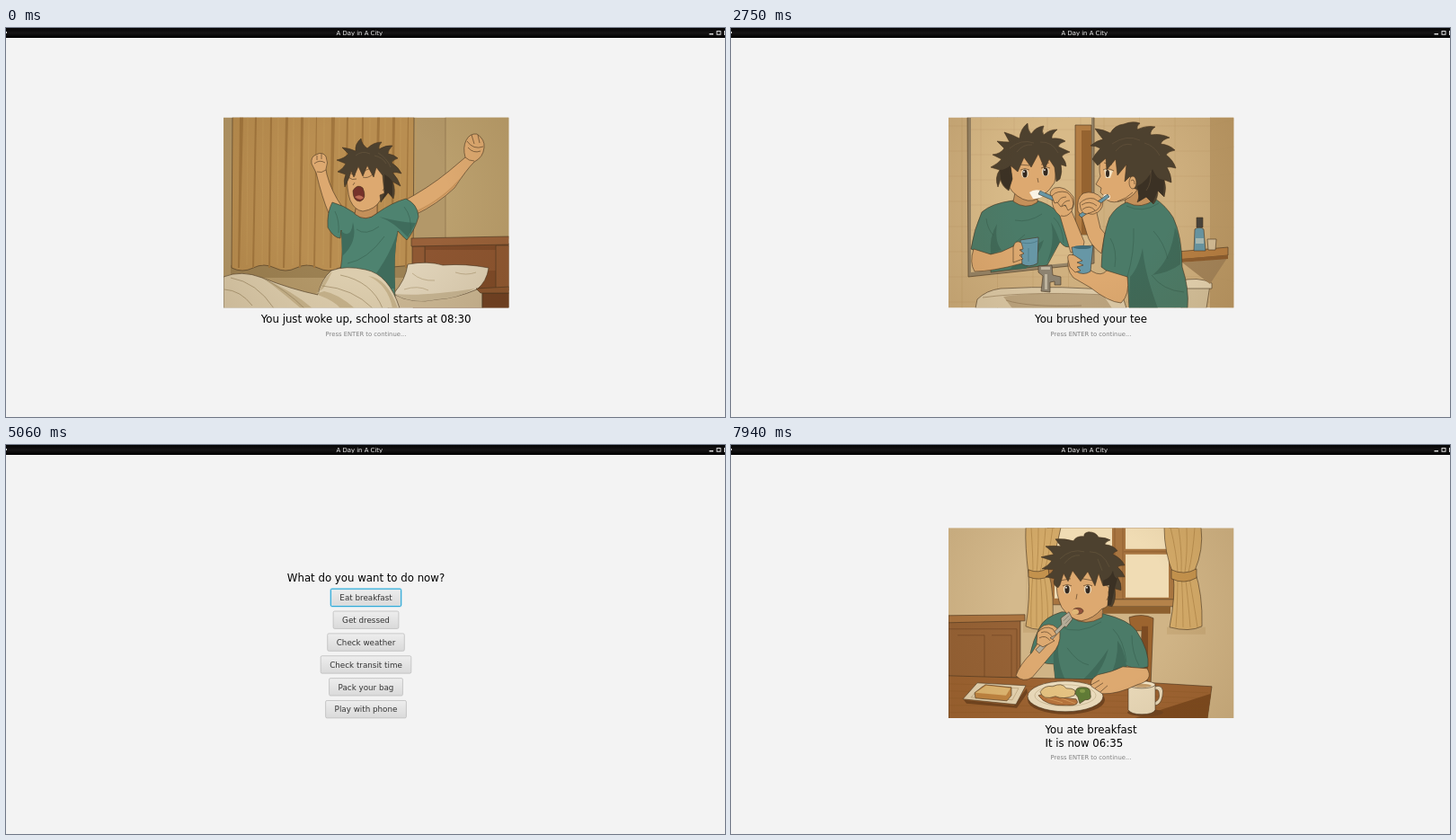
An HTML page with a canvas for the animation above (8 s loop, 800 by 433 pixels).

```html
<!DOCTYPE html>
<html lang="en">
<head>
<meta charset="utf-8">
<title>A Day in A City</title>
<style>
html, body { margin: 0; width: 100%; height: 100%; overflow: hidden; background: #f3f3f3; }
canvas { display: block; }
</style>
</head>
<body>
<canvas id="stage" width="800" height="433"></canvas>
<script>
const g = document.getElementById('stage').getContext('2d');
const MID = 400.5, LOOP = 8000, STEP = 62.5, CHAR = 51, BUTTON = 93;
const SKIN = '#dda970', SHADE = '#c4905a', HAIR = '#4d412f', LOCK = '#3b3124', SHIRT = '#4b7b68', DARK = '#38614f';
const BLUE = '#6797a6', INK = '#46331f';
const series = (n, f) => Array.from({ length: n }, (_, i) => f(i));
const oval = (x, y, a, b) => `M${x - a} ${y}a${a} ${b} 0 1 0 ${2 * a} 0a${a} ${b} 0 1 0 ${-2 * a} 0z`;
const eye = (x, y) => [
  '#f0dfc0 ' + oval(x, y, 4, 5), '#33281f ' + oval(x, y, 2.6, 4.6), '#fff ' + oval(x - 1, y - 2, .8, 1),
  `-${INK} M${x - 5} ${y - 4}Q${x} ${y - 7} ${x + 5} ${y - 4}`];

// Each entry is "colour path"; "+" also outlines the shape, "-" only strokes it.
const bedroom = [
  '#b39869 M242 99h318v213H242z', '#bba06e M489 99h71v136h-71z', '-#836a45 M489 99V234',
  '#9c8153 M250 264H454V278H250z',
  '+#b98e51 M252 99L251 267Q263 273 275 267T299 267T323 267T347 267T371 267T395 267T419 267L453 264L454 99z',
  ...series(12, i => `#a1763e M${260 + i * 17} 99l${-2 - i % 2} 168h2l${4 - i % 3}-168z`),
  ...series(12, i => `-#c39a5c M${269 + i * 17} 99l-1 165`),
  '+#7e4a29 M453 240H560V312H453z', '#8d5531 M467 247H545V270H467z',
  '+#8f5833 M452 243H466V275H452zM545 242H560V292H545z', '+#99613a M451 234L560 232V241L451 243z',
  '+#cbb896 M430 296L530 290V312H425z',
  '+#e0d3b9 M431 296Q445 280 447 263Q470 259 486 264Q512 262 537 267Q535 282 524 291Q500 301 480 302Q452 308 431 296z',
  '#c6b594 M432 296Q465 299 522 290Q500 302 480 302Q452 308 432 296z',
  '-#a8946f M452 273Q462 282 477 281M500 272Q512 276 523 272M443 291Q458 286 470 292',
  '+#6f4024 M530 295H560V312H530z', '+#8b5631 M523 290L560 288V295H528z',
  `+${SKIN} M359 206Q352 190 345 161L340 151Q339 143 345 141Q352 137 356 143Q359 150 356 157L357 163Q362 182 374 199z`,
  `-${INK} M343 151Q349 146 355 150M346 142v5M351 140v6M346 160Q351 162 356 158`,
  `+${SKIN} M440 194Q470 178 492 160L511 144Q508 133 512 125Q516 117 524 118Q533 124 532 133Q531 144 521 149Q512 158 499 178Q480 196 455 208z`,
  `-${INK} M513 126Q520 136 531 132M514 133Q520 140 528 137M518 119l3 10M525 119l2 9M511 144Q515 148 521 148`,
  `#c8945c M457 206Q480 194 499 177L507 165Q486 190 457 203z`,
  `+#4e8370 M363 194Q375 197 388 206Q400 217 413 206Q430 194 445 190Q458 196 459 210Q455 225 446 236Q441 232 436 226Q430 250 433 300H366L372 270Q376 245 373 225L372 234Q365 234 358 222Q357 205 363 194z`,
  `#3f6c5c M436 226Q424 262 398 290H433Q431 252 436 226zM373 226Q384 236 386 216Q392 238 374 254zM415 210Q432 216 447 233L456 217Q437 216 415 210z`,
  `-${DARK} M380 262Q402 258 421 232M390 224Q400 232 415 221M366 204Q371 214 370 228M443 199Q452 210 450 228`,
  `+${SHADE} M390 196L388 207Q400 217 413 206V193z`,
  `+${SKIN} M379 158Q379 181 383 192Q388 203 397 204Q411 202 417 191Q427 186 427 174Q426 166 421 166L420 145H384z`,
  `-${INK} M381 166Q385 170 390 168M397 166Q402 168 408 163M381 161l8 3M396 160l10-4M419 181Q424 177 423 171M388 172l-2 3`,
  `+#75322a M386 181Q391 173 397 178Q402 190 394 193Q386 193 386 181z`, '#bd6c55 M388 188Q394 184 398 189Q394 193 388 188z',
  `+${HAIR} M382 166L377 177Q375 170 378 163L369 160Q376 156 378 151L368 147Q377 145 381 140L374 133Q383 134 389 137Q388 129 395 123Q396 130 402 134Q409 127 418 127Q414 131 415 135Q423 130 430 131Q425 136 425 140Q432 141 436 145Q430 147 429 150Q437 155 440 162Q434 160 430 161Q436 167 439 176L430 171Q434 180 431 190L425 183L417 194L416 186L421 184L419 164L412 155L409 166L402 153L397 165L392 154L387 166L384 159z`,
  `${LOCK} M421 163Q427 166 430 171L430 188L425 183L418 192L421 184z`,
  '-#6a5940 M389 142Q396 136 405 140M410 142Q419 144 423 151M414 139Q424 145 428 155',
  `+#dccdae M242 277Q262 269 285 278Q318 291 347 297Q351 279 362 270Q378 264 400 269Q426 274 438 312H242z`,
  '#c5b28c M344 296L353 290Q359 280 363 271Q353 277 347 297Q366 304 372 312H388Q370 296 354 293zM287 279Q302 290 328 312H341Q319 293 287 279zM403 276Q425 286 430 312H436Q424 278 403 276z',
  '-#8f7b56 M250 278Q279 283 298 312M285 278Q312 292 332 312M352 287Q386 290 408 312M372 275Q407 282 419 312M243 291Q261 292 274 309'
];

const bathroom = [
  '#cfb07f M242 99h318v213H242z', '#bd9b68 M533 99h27v213h-27z',
  ...series(8, i => `-#b9976699 M242 ${109 + i * 28}H533L560 ${102 + i * 30}`),
  ...series(8, i => `-#b9976699 M${257 + i * 39.5} 99V312`),
  '+#968467 M263 99H404V262L264 277z', '#d8ba88 M267 99H401V259L267 272z',
  ...series(6, i => `-#bea07499 M267 ${113 + i * 28}H401`), ...series(4, i => `-#bea07499 M${278 + i * 37} 99V262`),
  '+#b27d44 M383 108H401V230H383z', '#956330 M390 114H401V230H390z',
  `+${SHIRT} M314 192Q290 195 279 205Q270 225 267 246Q278 252 290 252L289 272L352 264L366 238Q372 246 378 243Q375 215 362 203Q350 194 340 192z`,
  `#3f6a59 M289 252Q287 232 296 218Q293 238 301 247zM351 262L366 238Q361 224 356 216Q361 238 351 262zM310 269Q328 248 348 236Q344 252 328 268z`,
  `-${DARK} M284 212Q285 223 292 231M316 214Q331 217 346 207M310 247Q318 236 327 230M359 211Q369 220 370 239`,
  `+${SHADE} M317 179L314 193Q328 203 341 194V178z`,
  `+${SKIN} M304 150Q304 172 313 182Q325 194 336 192Q350 188 360 172L363 150L350 132H310z`,
  ...eye(327, 162), ...eye(350, 160),
  `-${INK} M321 152l11 1M345 152l9-2M341 167l1 5`,
  `+${HAIR} M309 181Q301 176 300 168L297 177Q293 166 299 158L289 155Q297 151 301 146L291 141Q300 140 304 134L296 126Q304 127 310 127L304 116Q314 119 321 123Q322 112 330 106Q330 114 334 118Q339 110 348 109Q345 115 348 119Q354 113 363 113Q356 119 357 123Q366 122 372 126Q365 128 364 132L377 138Q370 140 368 143Q373 149 373 154L367 152Q369 160 366 168L362 171L360 155L354 146L349 157L342 140L334 155L326 144L319 160L311 153L313 168z`,
  `${LOCK} M299 158Q305 158 311 153L313 168L309 180Q302 175 300 168z`,
  '-#68573f M310 134Q323 123 337 128M344 127Q357 126 364 139M318 138Q325 129 335 130',
  `+${SKIN} M270 246Q265 261 271 271Q290 271 324 262L327 241Q320 235 314 243L301 249L289 252z`,
  `+${BLUE} M322 236L342 233L341 262Q332 267 324 263z`, '-#42707d M324 239Q334 241 341 237M331 245v15',
  `+${SKIN} M314 244Q316 235 323 239L325 246L321 247L326 251L321 253L325 257L314 261z`,
  `+${SKIN} M357 190Q352 182 360 178Q372 175 381 188Q383 196 379 204L393 238Q393 248 378 250L366 209Q357 202 357 190z`,
  '#faf4e5 M332 183Q338 178 349 182Q349 190 336 190z',
  `+${BLUE} M344 181L381 198L379 201L342 185z`,
  `+${SKIN} M357 187Q363 180 374 183Q383 190 380 200L375 203L372 197L367 199L363 194L360 195z`,
  `-${INK} M364 194Q366 188 373 188M368 198Q371 192 377 192M367 209Q374 211 379 204`,
  '+#dccaa8 M274 302Q284 292 300 290Q370 286 434 293L440 312H272z', '#bda681 M303 299Q337 293 414 297L424 312H313z',
  '-#8e7552 M280 300Q338 292 434 298M306 303Q330 311 390 309',
  '+#8d8371 M345 293L347 276L342 272V265L357 264L358 275L367 277V286H360V282L355 283V294z', '#c0b6a1 M345 266h10v3h-10zM349 274h3v17h-3z',
  '+#d6c39e M502 285Q522 279 533 286L529 312H501z', '+#e6d5b3 M497 282Q520 276 535 284V290H499z',
  '#a4855b M502 261L552 256L533 285z', '+#b77f43 M496 249L553 244V253L498 258z', '#8d5d2f M499 257L553 253V257L500 261z',
  `+${BLUE} M516 224Q521 220 526 224L528 248H515z`, '+#47433c M518 211h7v11h-7z', '#a9bdb9 M517 234h9v6h-9z', '+#d5bf99 M530 235h10l-1 12h-8z',
  `+${SKIN} M386 204Q384 189 392 184Q404 180 413 190Q416 200 407 206L411 223L416 229L412 251Q399 241 396 229L390 209z`,
  `+${SHADE} M440 180L438 198Q455 207 472 192L470 174z`,
  `+${SHIRT} M440 194Q428 199 421 211Q413 232 412 266Q425 277 441 277L443 312H508Q510 290 502 266Q502 232 492 211Q484 198 472 190Q457 203 440 194z`,
  `#3f6a59 M444 277Q453 268 458 245Q460 272 475 312H443zM494 222Q490 258 469 275Q488 272 500 263Q501 236 494 222z`,
  `-${DARK} M448 223Q449 250 441 277M422 234Q430 247 427 266M470 226Q482 239 486 257M468 275Q480 292 504 294M440 198Q458 207 476 195`,
  `+${SKIN} M418 270L441 277Q444 297 434 306Q420 305 400 289L381 278Q372 268 376 255Q382 248 388 260L402 271Q412 277 418 270z`,
  `+${BLUE} M379 244L403 242L400 271Q392 276 384 271z`, '#416c78 ' + oval(391, 244, 10, 2),
  `+${SKIN} M375 258Q373 250 382 253L391 259L385 261L392 264L385 266L389 270L383 272L377 266z`,
  `+${SKIN} M411 146Q409 158 411 165L406 174L412 178L411 183L416 188Q420 196 432 193Q446 190 452 180L455 150L440 130H415z`,
  '#f0dfc0 M415 157L425 159L422 167L417 167z', `#33281f ${oval(419, 162, 2, 4)}`,
  `-${INK} M414 158Q419 155 426 159M415 150l9 2M430 193Q440 190 447 183`,
  `+${HAIR} M402 146Q406 139 411 134Q406 131 400 131Q407 125 414 124Q409 118 405 112Q415 113 422 117Q427 108 437 107Q447 103 455 106Q451 109 452 113Q462 108 472 110Q466 114 467 119Q478 117 488 122Q480 124 478 129Q488 130 494 136Q487 137 484 141Q492 147 495 156Q488 154 485 155Q490 163 490 172L482 169Q485 178 482 188L475 181Q475 190 470 196L462 188L452 194L456 181L447 178L444 165L438 171L440 152L430 164L428 146L418 158L417 145L408 153z`,
  `${LOCK} M452 176Q464 170 469 157Q474 170 482 169L481 187L475 181L469 195L462 188L454 193z`,
  '-#68573f M424 129Q440 118 455 125M460 128Q471 131 477 142M428 137Q436 127 446 130M467 159Q468 173 462 181',
  `+${SKIN} ${oval(447, 172, 4, 7)}`, `-${INK} M445 170Q449 167 449 174`,
  '#faf4e5 ' + oval(418, 188, 4, 3), `+${BLUE} M387 208L419 185L421 188L390 211z`,
  `+${SKIN} M388 195Q395 188 404 190L412 195Q410 202 404 204L396 207Q389 207 388 195z`,
  `-${INK} M390 197Q399 191 407 198M391 202Q399 196 405 203M397 206Q403 209 407 205`
];

const breakfast = [
  '#d0b486 M242 99h318v213H242z', '#dac09466 M242 99H328V196H242z', '#ab8a5844 M325 205H365V216H325zM485 210H528V218H485z',
  '+#a87540 M352 99H497V185H352z', '#f0dcb4 M360 99H424V178H360zM439 99H487V123H439zM439 129H487V177H439z',
  '-#815326 M427 99V182M436 99V182M437 126H488', '+#b4824a M410 179H494V187H410z', '#8d602f M414 187H489V195H414z',
  '+#d2a968 M328 99H367Q363 124 353 147Q361 176 357 209Q343 216 328 209Q333 177 331 151Q327 120 328 99z',
  '+#d2a968 M482 99H523Q526 124 516 147Q525 173 524 209Q510 216 488 210Q495 174 492 151Q482 126 482 99z',
  ...series(4, i => `-#a77c40 M${334 + i * 8} 99Q${336 + i * 6} 130 ${336 + i * 4} 150Q${333 + i * 7} 185 ${334 + i * 6} 210`),
  ...series(4, i => `-#a77c40 M${489 + i * 9} 99Q${496 + i * 6} 128 ${497 + i * 4} 149Q${497 + i * 6} 183 ${495 + i * 8} 210`),
  '+#c3924d M331 146Q342 151 353 144L354 153Q343 159 331 154zM490 146Q504 153 518 145V155Q504 163 490 156z',
  '+#966236 M242 201H322V266H242z', '+#ab7440 M242 197L327 196V203L242 205z', '-#6b4120 M242 212H318V266M252 219H282V266M290 219H312V266',
  '+#9c642f M443 199Q458 194 470 200L467 275H455L457 214H445z', '#7d4b22 M457 209h7v62h-7z',
  `+${SHIRT} M368 193Q348 199 343 211Q336 225 333 239Q344 252 359 251L361 270H441L440 253Q453 258 464 254Q466 237 451 214Q443 202 414 195z`,
  `#3f6a59 M359 251Q357 232 366 222Q360 243 372 269H361zM440 253Q437 233 430 225Q431 250 419 270H441zM390 270Q406 255 420 234Q415 255 401 270z`,
  `-${DARK} M365 209Q386 220 412 204M446 219Q446 238 454 253M374 233Q386 250 398 252M425 212Q437 224 440 249M347 218L342 241`,
  `+${SHADE} M382 191L379 199Q394 210 413 199L414 184z`,
  `+${SKIN} M362 152Q361 175 368 188Q378 202 390 203Q404 200 412 190Q423 187 425 173Q425 165 419 165L416 140H370z`,
  ...eye(374, 168), ...eye(397, 168),
  `-${INK} M367 158l11-2M391 156l11 2M385 173l-1 6M418 180Q422 175 420 170M372 156`,
  `+#91523b ${oval(386, 192, 6, 3.5)}`, '#e0b676 ' + oval(383, 193, 4, 3),
  `+${HAIR} M364 166Q357 163 360 156L350 154Q357 150 359 146L346 145Q354 141 357 136L345 132Q353 130 359 129Q356 124 350 120Q360 119 367 120Q364 116 361 112Q371 111 381 114Q384 108 393 109Q392 105 398 104Q406 104 409 110Q417 110 422 113Q416 115 416 118Q426 119 430 125Q426 126 425 129Q434 133 438 141Q432 141 430 143Q436 148 438 154L430 154Q435 161 434 169L427 167Q429 179 424 187L419 186L421 163L414 164L409 150L405 164L397 148L389 159L380 147L375 159L370 150L366 163z`,
  `${LOCK} M414 158Q422 156 425 147Q426 155 430 156L427 167L423 185L419 186L421 163L414 164z`,
  '-#69593f M366 134Q378 122 393 126M399 126Q414 126 421 143M371 139Q379 129 388 130M408 134L413 147',
  `+#9d6332 M242 264Q304 266 404 268L535 276L530 312H242z`, '#7c491f M447 312L534 284L530 312z',
  ...series(5, i => `-#80501f66 M242 ${273 + i * 8}Q350 ${276 + i * 7} 531 ${283 + i * 6}`),
  '#704420 M259 291L315 297L329 278L330 283L318 300L262 295z', '+#e6d5b3 M258 290L274 272L328 275L317 296z', '-#b39b72 M267 288L279 276L320 278L313 291z',
  '+#c18643 M271 283L283 274L312 277V286L307 292L272 289z', '#e0b873 M272 283L284 275L311 278L306 286z',
  '#704420 ' + oval(373, 291, 43, 16), '+#ebdcbd ' + oval(372, 287, 42, 17), '-#bda983 ' + oval(372, 286, 34, 12),
  '+#b7743d M342 286Q352 281 365 288L384 290Q390 298 373 297Q350 298 342 286z', '-#e3b06d M348 288L369 294M362 287L383 295',
  '+#e5c382 M344 282Q349 274 358 276Q368 271 373 278Q387 278 382 286Q370 291 361 287Q347 292 344 282z',
  '+#607b36 M383 284Q383 276 391 277Q401 276 400 285Q402 291 394 291L388 295L386 288z', '#839948 ' + oval(391, 281, 3, 2),
  '#704420 ' + oval(461, 305, 20, 4),
  '+#e8d8b8 M471 276Q483 273 480 287Q478 298 470 297L472 293Q478 291 476 282Q475 278 471 280z',
  '+#e8d8b8 M442 274V302Q445 307 457 307Q470 307 472 302V274z', '+#f2e4c6 ' + oval(457, 274, 15, 4), '#c29b69 ' + oval(457, 275, 11, 2),
  `+${SKIN} M436 254L463 256Q471 269 452 274Q430 285 413 284L401 276Q398 269 408 263Q424 260 436 254z`,
  `-${INK} M401 274L410 269M405 278L414 272M411 282L419 275`,
  `+${SKIN} M335 238Q321 252 317 264Q325 272 335 266Q347 252 357 240Q367 230 366 216Q360 204 348 208Q338 214 341 228z`,
  '+#b5ac98 M339 235L368 207L367 200L376 193L380 201L373 210L371 209L343 239z', '-#6b6354 M370 203l6-6M372 206l6-6',
  `+${SKIN} M341 216Q349 207 358 212L362 218L355 222L360 225L353 229L347 232L340 228z`,
  `-${INK} M345 216Q352 213 357 220M343 222Q350 218 355 225`
];

function paint(list) {
  g.lineWidth = .6;
  for (const item of list) {
    const [, mode, color, d] = item.match(/^([+-]?)(\S+) (.*)$/);
    const path = new Path2D(d);
    if (mode !== '-') { g.fillStyle = color; g.fill(path); }
    if (mode) { g.strokeStyle = mode === '-' ? color : INK; g.stroke(path); }
  }
  // Soft darkening towards the corners.
  const fade = g.createRadialGradient(MID, 190, 90, MID, 190, 200);
  fade.addColorStop(0, '#5a370a00');
  fade.addColorStop(1, '#5a370a22');
  g.fillStyle = fade;
  g.fillRect(242, 99, 318, 213);
}

function write(s, x, y, size, color, align = 'center') {
  g.font = `${size}px "DejaVu Sans", sans-serif`;
  g.fillStyle = color;
  g.textAlign = align;
  g.fillText(s, x, y);
}

function titleBar() {
  const shade = g.createLinearGradient(0, 0, 0, 11);
  shade.addColorStop(0, '#050505');
  shade.addColorStop(.5, '#161415');
  shade.addColorStop(1, '#000');
  g.fillStyle = shade;
  g.fillRect(0, 0, 800, 11);
  g.save();
  g.beginPath();
  g.rect(0, 0, 800, 8.7);
  g.clip();
  write('A Day in A City', 393.3, 8, 6.9, '#eee');
  g.restore();
  g.fillStyle = g.strokeStyle = '#ddd';
  g.fillRect(0, 4, 1, 2);
  g.fillRect(782.5, 6, 4.5, 1.5);
  g.fillRect(799, 3, 1, 5);
  g.lineWidth = 1;
  g.strokeRect(791, 3.5, 4, 3.8);
}

function story(scene, text, count) {
  const lines = text.slice(0, count).split('\n');
  const lift = lines.length > 1 ? 7.2 : 0;
  g.save();
  g.translate(0, -lift);
  g.beginPath();
  g.rect(242, 99.8, 317.3, 211.4);
  g.clip();
  paint(scene);
  g.restore();
  g.font = '11.75px "DejaVu Sans", sans-serif';
  const left = MID - Math.max(...lines.map(s => g.measureText(s).width)) / 2;
  lines.forEach((s, i) => write(s, left, 328.2 - lift + i * 14.6, 11.75, '#000', 'left'));
  write('Press ENTER to continue...', MID, 342.8 + lift, 6.8, '#808080');
}

const actions = ['Brush your teeth', 'Eat breakfast', 'Get dressed', 'Check weather',
  'Check transit time', 'Pack your bag', 'Play with phone', 'Exit home'];

function menu(labels, count, pressed) {
  const shown = labels.slice(0, count);
  const top = 123 + (8 - shown.length) * 12.43;
  write('What do you want to do now?', MID, top + 4.2, 11.75, '#000');
  shown.forEach((label, i) => {
    const y = top + 22 + i * 24.86;
    g.font = '8.75px "DejaVu Sans", sans-serif';
    const w = g.measureText(label).width + 20;
    const down = pressed && !i;
    const face = g.createLinearGradient(0, y - 10, 0, y + 10);
    face.addColorStop(0, down ? '#d9d9d9' : '#eeeeee');
    face.addColorStop(1, down ? '#c5c5c5' : '#d9d9d9');
    g.beginPath();
    g.roundRect(MID - w / 2, y - 9.7, w, 19.4, 1.5);
    g.fillStyle = face;
    g.fill();
    if (!i) {
      g.strokeStyle = '#bfe4f2';
      g.lineWidth = 2.2;
      g.stroke();
    }
    g.strokeStyle = i ? '#bdbdbd' : '#2ba6d4';
    g.lineWidth = i ? .8 : 1;
    g.stroke();
    write(label, MID, y + 3.2, 8.75, '#333');
  });
}

function draw(now) {
  // The screen refreshes sixteen times a second.
  const t = Math.floor((now % LOOP + 3) / STEP) * STEP;
  const since = (start, pace) => Math.floor((t - start) / pace);
  g.fillStyle = '#f3f3f3';
  g.fillRect(0, 0, 800, 433);
  titleBar();
  if (t < 62.5) story(bedroom, 'You just woke up, school starts at 08:30');
  else if (t < 1875) menu(actions, since(62.5, BUTTON), t >= 1562.5);
  else if (t < 4437.5) story(bathroom, 'You brushed your teeth.\nIt is now 06:05', 3 + since(1875, CHAR));
  else if (t < 6250) menu(actions.slice(1), since(4437.5, BUTTON), t >= 5875);
  else story(breakfast, 'You ate breakfast\nIt is now 06:35', 1 + since(6250, CHAR));
}

const begin = performance.now();
function tick() {
  draw(performance.now() - begin);
  requestAnimationFrame(tick);
}
tick();
</script>
</body>
</html>
```
